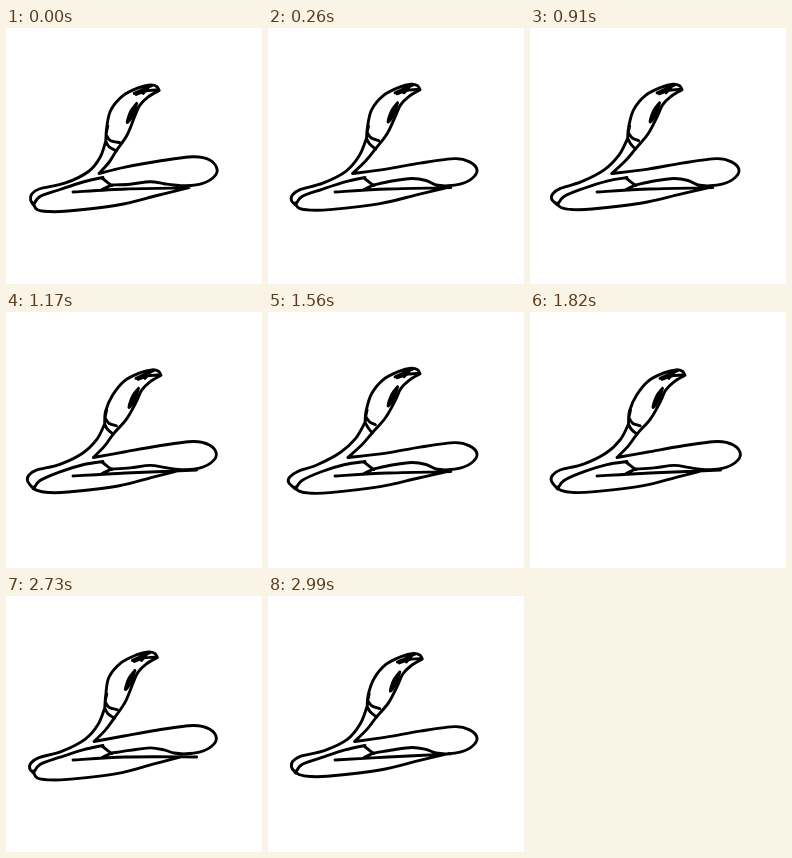
Write an HTML page that moves like this. It is 256 px wide and 256 px high and loops after 3120 ms.

```html
<!DOCTYPE html>
<html lang="en">
<head>
<meta charset="utf-8">
<title>Swaying cobra</title>
<style>
  html, body { margin: 0; width: 100%; height: 100%; overflow: hidden; background: #fff; }
  svg { display: block; width: 100%; height: 100%; }
  path { stroke: #000; stroke-width: 2.9; stroke-linecap: round; stroke-linejoin: round; }
</style>
</head>
<body>
<svg viewBox="0 0 256 256">
  <path id="lines" fill="none"/>
  <path id="mark" stroke-width="2"/>
</svg>
<script>
const STEP = 130, COUNT = 24, DRAWINGS = 5;
const lines = document.getElementById('lines');
const mark = document.getElementById('mark');

const mix = (a, b, t, dx = 0, dy = 0) =>
  [a[0] + (b[0] - a[0]) * t + dx, a[1] + (b[1] - a[1]) * t + dy];

// Smooth curve through all points
function curve(...pts) {
  const at = n => pts[Math.max(0, Math.min(pts.length - 1, n))];
  let d = `M${pts[0]}`;
  for (let n = 0; n < pts.length - 1; n++) {
    const [a, b, c, e] = [at(n - 1), at(n), at(n + 1), at(n + 2)];
    const k1 = b.map((v, j) => v + (c[j] - a[j]) / 6);
    const k2 = c.map((v, j) => v - (e[j] - b[j]) / 6);
    d += `C${k1} ${k2} ${c}`;
  }
  return d;
}

function draw(i) {
  // The neck leans once per loop; the line work wobbles through five drawings
  const lean = (1 - Math.cos(2 * Math.PI * i / COUNT)) / 2;
  const turn = 2 * Math.PI * (i % DRAWINGS) / DRAWINGS;
  const c = Math.cos(turn), s = Math.sin(turn), c2 = Math.cos(2 * turn);

  const head = (x, y) => [x + .2 - 1.9 * s, y + .4 - s];
  const cx = 99.3 + .5 * c - .5 * s - 1.5 * lean, cy = 111.5 + 1.5 * c;
  const rx = 109.3 + 1.2 * c - .8 * s - 3.5 * lean, ry = 121.5 + c;
  const lx = 23.7 + .5 * c - 3 * lean, ly = 169 + 1.2 * s - 2 * lean;
  const left = [cx, cy], right = [rx, ry];
  const foot = [89 + 4 * c - 1.5 * s - 5 * lean, 145.5];
  const bend = [80.5 + 2 * c - s - 6 * lean, 143.5 - 3 * lean];
  const tail = [27.5, 177];
  const belly = 181.8 + 1.2 * c + 1.4 * s - lean;
  const edge = 210 + 1.2 * c, top = 129.8 - c;
  const end = [179 + 4 * c2, 159 + 1.5 * s + .7 * c];
  const fold = 152.2 + 1.5 * c - .8 * s;

  const strokes = [
    // hood, front and back
    curve(left, [cx + 1, 99], head(104.5, 82), head(116.5, 67.5), head(132, 59.5),
          head(144, 56.5), head(150.5, 58), head(153, 62)),
    curve(head(153, 62), head(142, 68.5), head(133.5, 77), head(128.5, 88),
          mix(head(128.5, 88), right, .5, 1.5, 1.5), right, mix(right, foot, .5, 1.5), foot),
    curve([cx + 2, 98], [cx + .5, 105], left),
    // face
    curve(head(128, 65), head(137, 61), head(146, 57)),
    curve(head(130, 66), head(140, 62.5), head(152, 61.5)),
    curve(head(137, 65), head(144, 57)),
    // collar
    curve([cx + .5, cy - 6], [cx + 4.5, cy - .5], [rx + 3, ry - 8]),
    curve(left, [cx + 3, cy + 5.5], [rx, ry + .5]),
    // neck down to tail
    curve(left, mix(left, bend, .5, 3, 1), bend, [bend[0] - 23, bend[1] * .55 + ly * .45],
          [lx + 9, ly - 8], [lx + 1.3, ly - 2.5], [lx + .4, ly + 3], tail),
    curve(tail, [34, 168.5], [54, 161.5 - 2 * lean], [77, 154 - 1.5 * lean], [97, 149.5]),
    // coil
    curve([27, 175], [31, belly - 1.5], [42, belly + .5], [62, belly], [112, belly - 6],
          mix(end, [112, belly - 6], .45), end),
    curve(foot, [118, top + 10.5], [152, top + 4.5], [187, top], [edge - 7, top + 3.5],
          [edge, 142], [edge - 5, 150.5], [edge - 17, 156.2], [180, 157.8], [168, 157],
          [158, fold + 2], [144, fold], [124, fold + 2.5], [106, 157]),
    curve([67, 164], [120, 161], [185 - 7 * c2, end[1] + .3]),
    curve([96, 150], [105, 157.2], [105, 157.2], [96, 161.5])
  ];
  lines.setAttribute('d', strokes.join(''));
  mark.setAttribute('d', curve(head(130.5, 75), head(124.5, 83), head(121, 94),
                               head(126.5, 87), head(130.5, 75)));
}

let shown = -1;
function tick() {
  const i = Math.floor(performance.now() / STEP) % COUNT;
  if (i !== shown) draw(shown = i);
  requestAnimationFrame(tick);
}
tick();
</script>
</body>
</html>
```
